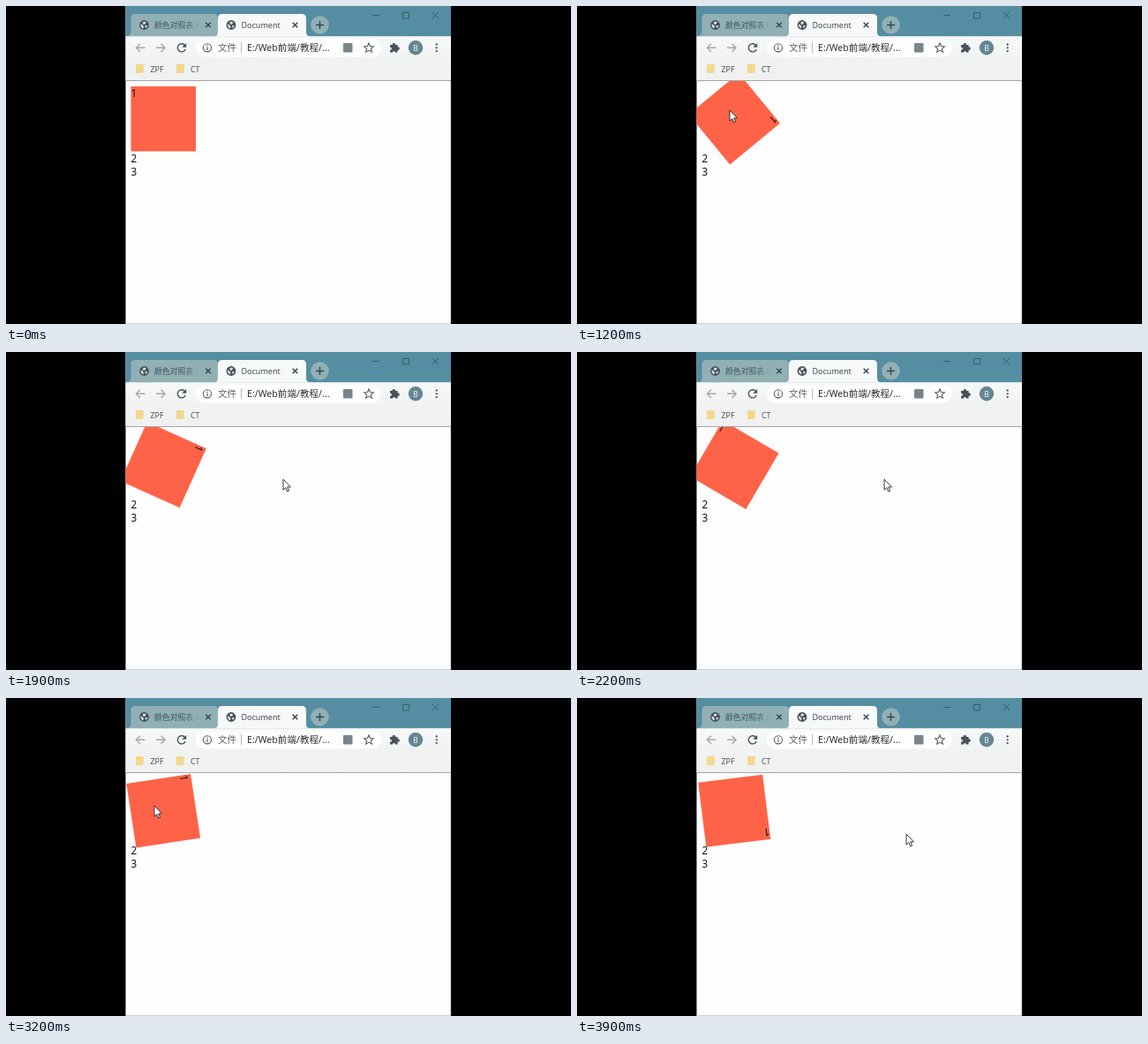
An HTML page that plays this animation: 640x360 px, repeating every 4 s.

```html
<!DOCTYPE html>
<html lang="zh">
<head>
<meta charset="utf-8">
<title>Rotating box</title>
<style>
html, body { margin: 0; width: 100%; height: 100%; overflow: hidden; background: #000; }
svg { display: block; width: 640px; height: 360px; }
text { font-family: "Noto Sans", "Noto Sans CJK SC", "Noto Sans CJK", sans-serif; }
.line { fill: none; stroke-width: 1.4; }
</style>
</head>
<body>
<svg viewBox="0 0 640 360">
  <defs>
    <clipPath id="page"><rect x="135.5" y="85" width="368.5" height="274.5"/></clipPath>
    <clipPath id="win"><rect x="135.5" y="0" width="368.5" height="360"/></clipPath>
    <linearGradient id="fade" gradientUnits="userSpaceOnUse" x1="202" y1="0" x2="220" y2="0">
      <stop offset="0" stop-color="#3b5058"/>
      <stop offset="1" stop-color="#3b5058" stop-opacity="0"/>
    </linearGradient>
    <linearGradient id="bar" x1="0" y1="0" x2="0" y2="1">
      <stop offset="0" stop-color="#f7f8f8"/>
      <stop offset=".5" stop-color="#f1f2f2"/>
      <stop offset="1" stop-color="#f0f0f0"/>
    </linearGradient>
    <g id="globe">
      <circle r="5.4" fill="#45525a"/>
      <path d="M-3.9 -1.2L-1.2 .4 -.6 2.2 -1 4C-3 3.4 -4.4 1.4 -3.9 -1.2ZM-.6 -4L2.2 -3.2 1.4 -1.2 -1 -.6 -1.6 -2.4ZM1 .8L3.8 .4 2.8 2.8 1.4 3.2Z" fill="#d9e1e3"/>
    </g>
    <path id="cross" d="M-2.8 -2.8L2.8 2.8M2.8 -2.8L-2.8 2.8"/>
    <path id="folder" d="M0 .6Q0 0 .6 0H8.2Q8.8 0 8.8 .6V8.6L7.6 10H.6Q0 10 0 9.4Z" fill="#f3d78c"/>
  </defs>

  <rect width="640" height="360" fill="#000"/>
  <rect x="135.5" width="368.5" height="360" fill="#fefefe"/>

  <!-- title bar and tabs -->
  <rect x="135.5" width="368.5" height="34.5" fill="#558da2"/>
  <path d="M137 34Q141.5 34 141.5 29V14Q141.5 9 146.5 9H235Q240 9 240 14V34Z" fill="#91b0b6"/>
  <path d="M235 34.5Q240 34.5 240 29.5V14Q240 9 245 9H335Q340 9 340 14V29.5Q340 34.5 345 34.5Z" fill="#f7f8f8"/>
  <use href="#globe" x="156.500" y="21.500"/>
  <use href="#globe" x="255" y="21.500"/>
  <text x="168" y="24.700" font-size="8.900" fill="url(#fade)">颜色对照表.h</text>
  <text x="266.500" y="24.700" font-size="9" fill="#3c4a50">Document</text>
  <g class="line" stroke="#34444b">
    <use href="#cross" x="229" y="21.500"/>
    <use href="#cross" x="327.500" y="21.500"/>
  </g>
  <circle cx="355.500" cy="21.500" r="10.300" fill="#91b0b6"/>
  <path class="line" d="M351 21.500H360M355.500 17V26" stroke="#34444b"/>
  <g class="line" stroke="#2f5361" style="stroke-width:.8">
    <path d="M415 10.500H423M449.500 7.500H456.500V14H449.500ZM483 7L490 14M490 7L483 14"/>
  </g>

  <!-- toolbar -->
  <rect x="135.500" y="34.500" width="368.500" height="50" fill="url(#bar)"/>
  <rect x="215" y="37.500" width="210" height="20" rx="10" fill="#fefefe"/>
  <g class="line" stroke="#a4a8aa">
    <path d="M157.500 47.300H147.500M152 42.700L147.400 47.300 152 51.900"/>
    <path d="M170 47.300H180M175.500 42.700L180.100 47.300 175.500 51.900"/>
  </g>
  <path class="line" d="M202.600 44.500A4.600 4.600 0 1 0 203.200 49" stroke="#47535a"/>
  <path d="M204.200 42V46.800H199.400Z" fill="#47535a"/>
  <circle class="line" cx="228" cy="47.300" r="4.600" stroke="#555d62" style="stroke-width:1.100"/>
  <path class="line" d="M228 46.600V50M228 44.500V45.700" stroke="#555d62" style="stroke-width:1.200"/>
  <text x="240" y="51" font-size="10.600" fill="#5c6266">文件</text>
  <path d="M266.500 41V53.500" stroke="#b4b8ba" stroke-width=".9"/>
  <text x="273" y="51" font-size="10.600" fill="#2c3033">E:/Web前端/教程/...</text>
  <rect x="382" y="42" width="10.500" height="10.500" rx="1" fill="#7b8489"/>
  <path class="line" id="star" stroke="#555d62" style="stroke-width:1.100"/>
  <path d="M435 44H437.700A1.700 1.700 0 1 1 441 44H443.600V46.300A1.800 1.800 0 1 1 443.600 49.800V52.500H440.900A1.500 1.500 0 1 0 437.900 52.500H435V49.700A1.500 1.500 0 1 0 435 46.800Z" fill="#47535a"/>
  <circle cx="464" cy="47.300" r="8.200" fill="#648793"/>
  <text x="464" y="50.500" font-size="8.500" fill="#f2f6f7" text-anchor="middle">B</text>
  <g fill="#47535a">
    <circle cx="487.700" cy="43.500" r="1.150"/><circle cx="487.700" cy="47.300" r="1.150"/><circle cx="487.700" cy="51.100" r="1.150"/>
  </g>

  <!-- bookmarks -->
  <use href="#folder" x="147" y="66"/>
  <use href="#folder" x="193" y="66"/>
  <g font-size="8.900" fill="#4a5358">
    <text x="163.500" y="74.600">ZPF</text>
    <text x="209" y="74.600">CT</text>
  </g>
  <path d="M135.500 84.500H504" stroke="#a3a5a6"/>
  <path d="M135.500 359.600H504M503.700 85V360" stroke="#b5b8b9" stroke-width=".7"/>

  <!-- page -->
  <g clip-path="url(#page)" font-size="11.760" fill="#111">
    <text x="141.500" y="177">2</text>
    <text x="141.500" y="192.300">3</text>
    <g id="box">
      <rect x="141.500" y="91" width="73.500" height="73.500" fill="#ff6347"/>
      <text x="141.500" y="103.300">1</text>
    </g>
  </g>
  <g clip-path="url(#win)">
    <path id="cursor" d="M0 0V12.200L2.800 9.600 4.700 14 6.600 13.200 4.700 8.900H8.500Z" fill="#fff" stroke="#222" stroke-width=".9" stroke-linejoin="round"/>
  </g>
</svg>
<script>
const LOOP = 4000, STEP = 100, SPIN = 1000, TURN = 180;
const CENTER = "178.25 127.75";
const box = document.getElementById("box");
const cursor = document.getElementById("cursor");

// hover periods: pointer enters, pointer leaves
const hovers = [[721, 1670], [2930, 3847]];

// pointer path: time, x, y
const path = [
  [100, 497, 184], [400, 335, 168], [600, 238, 149], [700, 216, 143],
  [900, 185, 124], [1200, 173, 118], [1500, 176, 120], [1670, 216, 132],
  [1900, 314, 144], [2200, 348, 144], [2600, 350, 144], [2800, 276, 140],
  [2930, 215, 133], [3200, 168, 122], [3650, 171, 124], [3800, 204, 133],
  [3900, 373, 154]
];

// cubic-bezier(.25, .1, .25, 1)
function ease(x) {
  if (x <= 0) return 0;
  if (x >= 1) return 1;
  const bez = (a, b, s) => 3 * a * s * (1 - s) ** 2 + 3 * b * s * s * (1 - s) + s ** 3;
  let lo = 0, hi = 1;
  for (let i = 0; i < 30; i++) {
    const mid = (lo + hi) / 2;
    if (bez(.25, .25, mid) < x) lo = mid; else hi = mid;
  }
  return bez(.1, 1, lo);
}

function angle(t) {
  const hover = hovers.filter(h => h[0] <= t).pop();
  if (!hover) return 0;
  const [enter, leave] = hover;
  const peak = ease((Math.min(t, leave) - enter) / SPIN);
  const back = t > leave ? ease((t - leave) / (SPIN * peak)) : 0;
  return TURN * peak * (1 - back);
}

function pointer(t) {
  const i = path.findIndex(p => p[0] >= t);
  if (i < 1) return path[0].slice(1);
  const [t0, x0, y0] = path[i - 1], [t1, x1, y1] = path[i];
  const k = (t - t0) / (t1 - t0);
  return [x0 + (x1 - x0) * k, y0 + (y1 - y0) * k];
}

function starPath(cx, cy, r) {
  const pts = Array.from({ length: 10 }, (_, i) => {
    const a = Math.PI * (i / 5 - .5), d = i % 2 ? r * .45 : r;
    return `${cx + d * Math.cos(a)} ${cy + d * Math.sin(a)}`;
  });
  return `M${pts.join("L")}Z`;
}

function draw(now) {
  const t = Math.floor(now % LOOP / STEP) * STEP;
  box.setAttribute("transform", `rotate(${angle(t)} ${CENTER})`);
  cursor.setAttribute("transform", `translate(${pointer(t).join(" ")})`);
  cursor.setAttribute("visibility", t < path[0][0] ? "hidden" : "visible");
}

document.getElementById("star").setAttribute("d", starPath(411, 47.6, 5.6));

let start;
function tick(now) {
  start ??= now;
  draw(now - start);
  requestAnimationFrame(tick);
}
draw(0);
requestAnimationFrame(tick);
</script>
</body>
</html>
```
